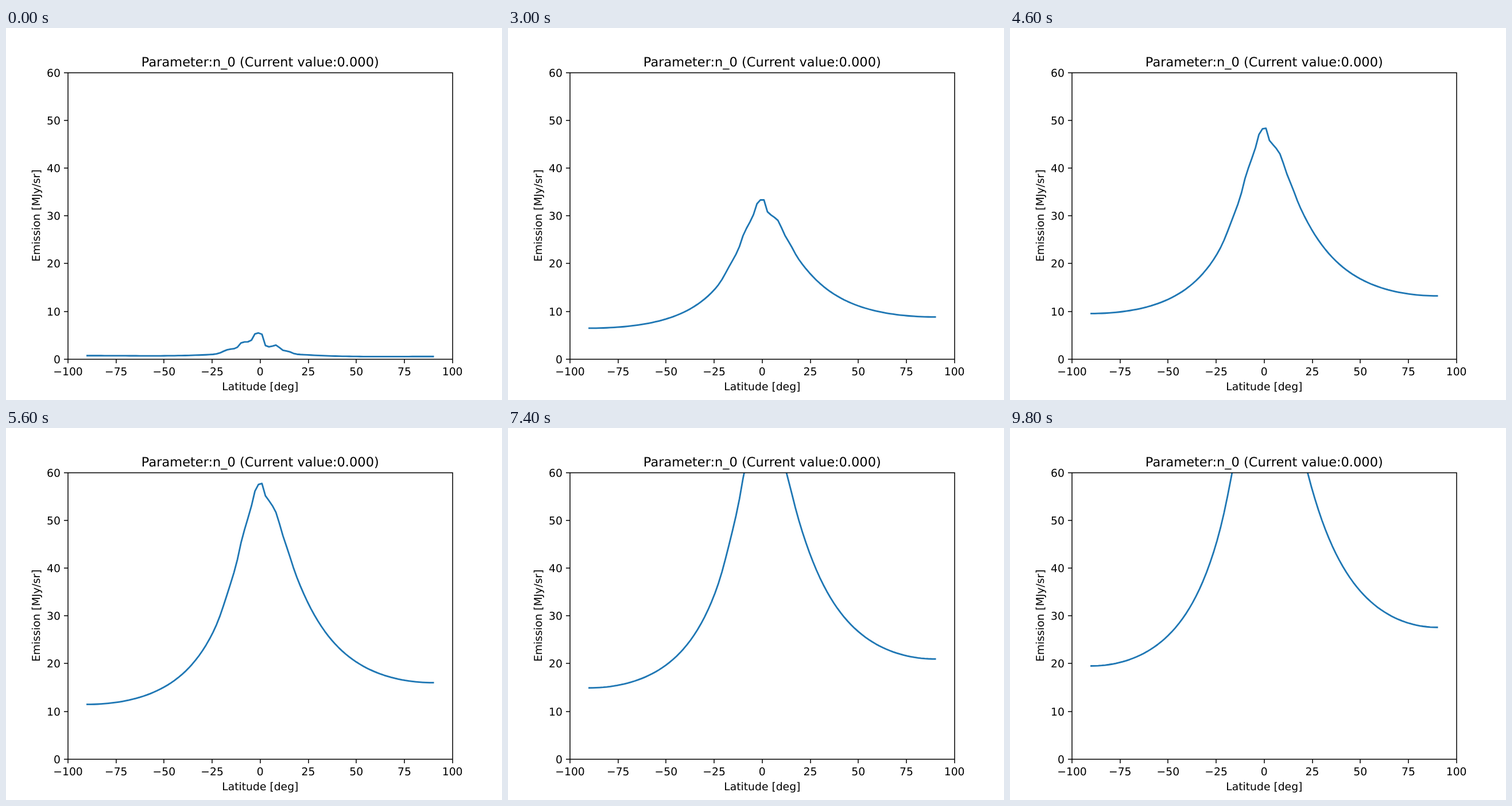
An HTML page with a canvas for the animation above (9.9 s loop, 864x648 px).

```html
<!DOCTYPE html>
<html lang="en">
<head>
<meta charset="utf-8">
<title>Emission by latitude</title>
<style>
  html, body { margin: 0; width: 100%; height: 100%; overflow: hidden; background: #fff; }
  canvas { display: block; }
</style>
</head>
<body>
<canvas id="stage" width="864" height="648"></canvas>
<script>
const ctx = document.getElementById('stage').getContext('2d');
const STEP_MS = 100, STEPS = 99, SAMPLES = 100;
const LEFT = 108, RIGHT = 777.6, TOP = 77.76, BOTTOM = 576.72;
const MID_X = (LEFT + RIGHT) / 2, MID_Y = (TOP + BOTTOM) / 2;

const xOf = lat => MID_X + lat * (RIGHT - LEFT) / 200;
const yOf = value => BOTTOM - value * (BOTTOM - TOP) / 60;
const sine = lat => Math.sin(lat * Math.PI / 180);

// Edges of the narrow bands near the equator: latitude, rise, softness.
const bandEdges = [
  [-19.5, 1, 1.4], [-11.1, 1.35, .6], [-3.8, 1.85, .5], [1.8, -2.9, .4],
  [6.8, .55, .6], [10, -1.25, .7], [16.3, -.62, .9]
];

// Emission at the first step: a broad hump plus the bands.
function baseEmission(lat) {
  const s = sine(lat);
  const hump = .58 - .08 * s + .06 * s ** 8 + .7 * Math.exp(-((lat / 29.4) ** 2));
  return bandEdges.reduce((sum, [edge, rise, softness]) =>
    sum + rise / (1 + Math.exp((edge - lat) / softness)), hump);
}

// Emission added per step: falls off from just north of the equator.
function growth(lat) {
  const d = sine(lat) - .02;
  const [linear, quadratic] = d < 0 ? [4.1, .98] : [3.35, .133];
  return 1 / (1.066 + linear * (Math.hypot(d, .3) - .3) + quadratic * d * d);
}

const samples = Array.from({ length: SAMPLES }, (_, i) => {
  const lat = -90 + 180 * i / (SAMPLES - 1);
  return { x: xOf(lat), base: baseEmission(lat), growth: growth(lat) };
});

function label(text, x, y, align = 'center', size = 18.75) {
  ctx.font = `${size}px "DejaVu Sans", sans-serif`;
  ctx.textAlign = align;
  ctx.fillText(text, x, y);
}

function drawCurve(step) {
  ctx.save();
  ctx.beginPath();
  ctx.rect(108, 78, 670, 499);
  ctx.clip();
  ctx.beginPath();
  for (const p of samples) ctx.lineTo(p.x, yOf(p.base + step * p.growth));
  ctx.strokeStyle = '#1f77b4';
  ctx.lineWidth = 2.8125;
  ctx.lineJoin = 'round';
  ctx.lineCap = 'square';
  ctx.stroke();
  ctx.restore();
}

function drawAxes() {
  ctx.fillStyle = ctx.strokeStyle = '#000';
  ctx.lineWidth = 1.5;
  ctx.beginPath();
  ctx.rect(108, 78, 670, 499);
  for (let lat = -100; lat <= 100; lat += 25) {
    const x = Math.round(xOf(lat));
    ctx.moveTo(x, 577);
    ctx.lineTo(x, 584);
    label(String(lat).replace('-', '\u2212'), xOf(lat), 605);
  }
  for (let value = 0; value <= 60; value += 10) {
    const y = Math.round(yOf(value));
    ctx.moveTo(108, y);
    ctx.lineTo(101, y);
    label(value, 94.9, y + 7, 'right');
  }
  ctx.stroke();

  label('Parameter:n_0 (Current value:0.000)', MID_X, 67, 'center', 22.5);
  label('Latitude [deg]', MID_X, 631);
  ctx.save();
  ctx.translate(59, MID_Y - .5);
  ctx.rotate(-Math.PI / 2);
  label('Emission [MJy/sr]', 0, 0);
  ctx.restore();
}

function render() {
  const step = Math.floor(performance.now() / STEP_MS) % STEPS;
  ctx.textRendering = 'geometricPrecision';
  ctx.fillStyle = '#fff';
  ctx.fillRect(0, 0, 864, 648);
  drawCurve(step);
  drawAxes();
  requestAnimationFrame(render);
}
render();
</script>
</body>
</html>
```
